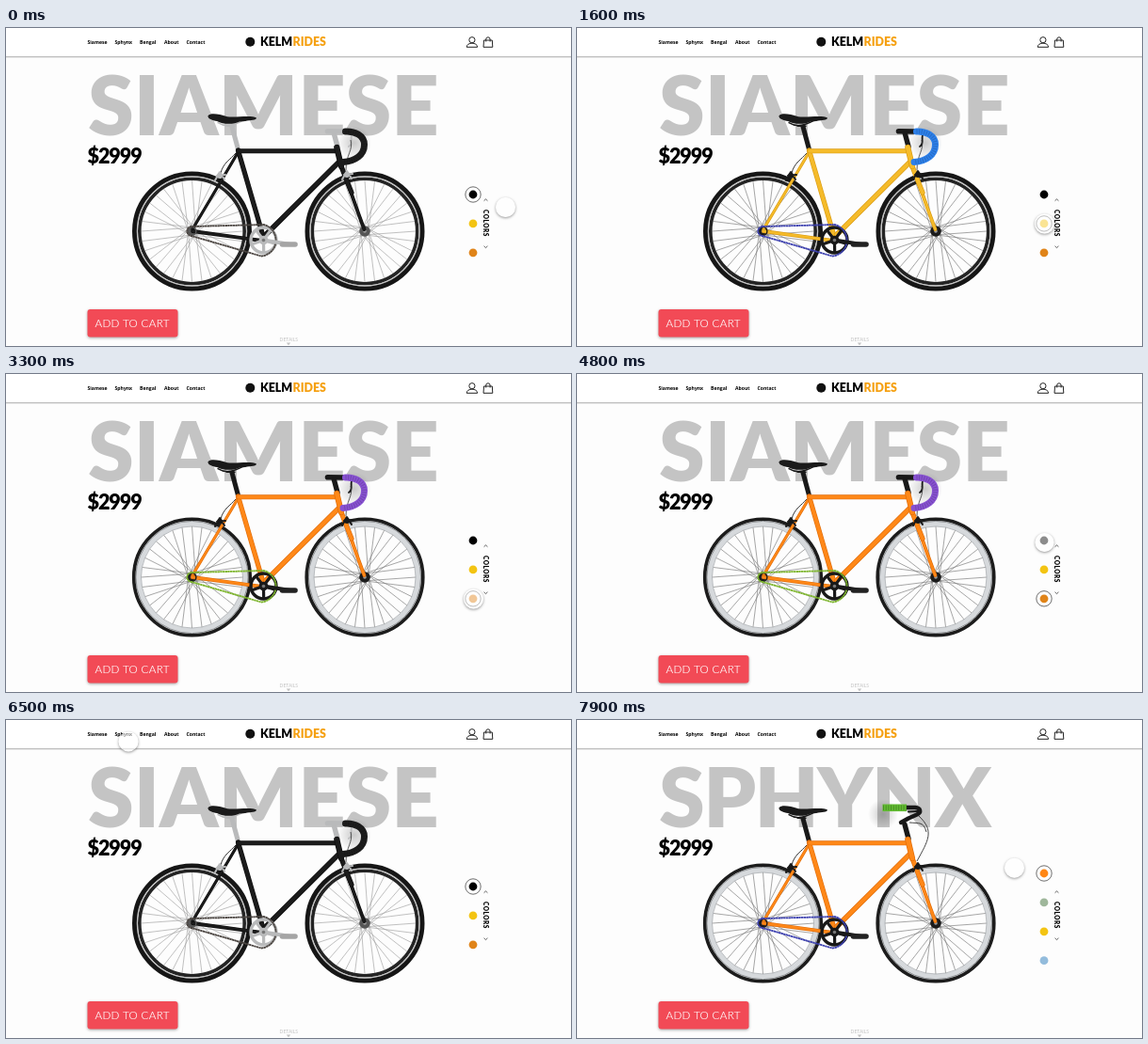
These frames come from a looping animation (600 px wide and 338 px high, 8 s). An HTML page:

```html
<!DOCTYPE html>
<html lang="en">
<head>
<meta charset="utf-8">
<title>Bike shop</title>
<style>
html, body { margin: 0; width: 100%; height: 100%; overflow: hidden; background: #fdfdfd; }
svg { position: absolute; left: 0; top: 0; font-family: Lato, sans-serif; }
#scenes { isolation: isolate; }
.scene { mix-blend-mode: plus-lighter; }
.nav { font: 700 5.1px "Open Sans", sans-serif; }
.button { fill: #f24a56; filter: drop-shadow(0 1px 1.5px rgba(0,0,0,.35)); }
#cursor {
  position: absolute; left: -10.5px; top: -10.5px; width: 21px; height: 21px; border-radius: 50%;
  background: rgba(255,255,255,.55); box-shadow: 0 1px 3px rgba(0,0,0,.42);
}
</style>
</head>
<body>
<svg width="600" height="338" viewBox="0 0 600 338">
  <radialGradient id="shade">
    <stop offset="0" stop-opacity=".2"/><stop offset="1" stop-opacity="0"/>
  </radialGradient>
  <rect width="600" height="30" fill="#fff"/>
  <path d="M0 30.4H600" stroke="#b4b4b4"/>
  <path d="M0 31.4H600" stroke="#e4e4e4"/>
  <g class="nav">
    <text x="86.5" y="17">Siamese</text><text x="115.5" y="17">Sphynx</text>
    <text x="142" y="17">Bengal</text><text x="168" y="17">About</text><text x="191.5" y="17">Contact</text>
  </g>
  <circle cx="259.3" cy="14.7" r="5" fill="#111"/>
  <g font-size="12.4" font-weight="900">
    <text x="270" y="19.2">KELM</text><text x="304.5" y="19.2" fill="#f5a011">RIDES</text>
  </g>
  <g fill="none" stroke="#222">
    <circle cx="494.9" cy="12.7" r="3.1"/>
    <path d="M489.2 20.3C489.2 14.8 500.6 14.8 500.6 20.3Z"/>
    <path d="M507.5 13H516.3L516.8 20.3H507Z"/>
    <path d="M509.7 14.5V12A2.2 2.2 0 0 1 514.1 12V14.5"/>
  </g>
  <g id="scenes"></g>
  <text x="86.5" y="143.7" font-size="21.6" font-weight="900" letter-spacing="-1.1">$2999</text>
  <rect class="button" x="86.5" y="299" width="96" height="29.5" rx="3"/>
  <text x="94.5" y="318" font-size="11.6" font-weight="300" letter-spacing=".35" fill="#fff" stroke="#fff" stroke-width=".15">ADD TO CART</text>
  <g fill="none" stroke="#333" stroke-width=".8">
    <path d="M507.6 183.7L509.5 181.9L511.4 183.7M507.6 231.8L509.5 233.6L511.4 231.8"/>
  </g>
  <text transform="translate(506.7 193) rotate(90)" font-size="6.5" font-weight="900" letter-spacing=".5">COLORS</text>
  <text x="300.3" y="333" font-size="5" fill="#c2c2c2" text-anchor="middle">DETAILS</text>
  <path d="M297.8 334.5H302.2L300 337.2Z" fill="#c2c2c2"/>
</svg>
<div id="cursor"></div>
<script>
const stroke = (d, color, width, extra = '') =>
  `<path d="${d}" fill="none" stroke="${color}" stroke-width="${width}" ${extra}/>`;
const ring = (x, y, r, color, width) =>
  `<circle cx="${x}" cy="${y}" r="${r}" fill="none" stroke="${color}" stroke-width="${width}"/>`;
const disc = (x, y, r, color) => `<circle cx="${x}" cy="${y}" r="${r}" fill="${color}"/>`;
const round = 'stroke-linecap="round" stroke-linejoin="round"';

function wheel(x, y, hub, b) {
  let spokes = '';
  for (let i = 0; i < 32; i++) {
    const a = i * Math.PI / 16, h = a + (i % 4 < 2 ? 1.25 : -1.25);
    spokes += `M${x + 4 * Math.cos(h)} ${y + 4 * Math.sin(h)}L${x + 54 * Math.cos(a)} ${y + 54 * Math.sin(a)}`;
  }
  const rim = b.silverRim
    ? ring(x, y, 56.8, '#d6d9dc', 5.6) + ring(x, y, 54, '#a0a4a8', .7) +
      ring(x, y, 59.6, '#8d9093', 1) + ring(x, y, 61.8, '#1c1c1c', 3.6)
    : ring(x, y, 55.7, '#242424', 3.6) + ring(x, y, 58.1, '#c4c4c4', 1.2) + ring(x, y, 61.1, '#161616', 4.8);
  return stroke(spokes, b.spoke, .65) + rim + disc(x, y, hub, b.hub) + disc(x, y, 1.8, '#999');
}

function tube(d, b, width) {
  return stroke(d, b.edge, width, round) + stroke(d, b.frame, width - 1.3, round);
}

function dropBar(b) {
  const grip = 'M360.5 110C370 109.5 380.5 114 380.5 124C380.5 135 371 141.5 358 142.5';
  return disc(370, 122, 18, 'url(#shade)') +
    stroke('M368 112C364 117 370 122 364 126', b.part, 1.8, round) +
    stroke('M366 119C369 130 361 134 361 151', '#333', .8) +
    stroke('M341.5 109.8L358 110', b.part, 5.6, round) +
    stroke(grip, b.grip, 7, 'stroke-linecap="round"') +
    stroke(grip, '#000', 5, 'stroke-dasharray="1 1.6" opacity=".16"');
}

function riserBar(b) {
  return disc(325, 100, 16, 'url(#shade)') +
    stroke('M363 102C380 118 373 128 361 150', '#333', .9) +
    stroke('M353 109C364 110 368 108 371 119', '#333', .9) +
    stroke('M344 109L352 104.5L361 100.5C366 98 365 93.5 359 93L350 93', b.part, 4.4, round) +
    stroke('M352 97.5L362 97', b.part, 2, round) +
    stroke('M324.5 93.3H350', b.grip, 7.6) +
    stroke('M325 93.3H350', '#000', 5.5, 'stroke-dasharray="1 1.7" opacity=".25"');
}

function bike(b) {
  let arms = '';
  for (let i = 0; i < 5; i++) {
    const a = i * Math.PI * .4 + .3;
    arms += `M273.5 225.5L${273.5 + 13 * Math.cos(a)} ${225.5 + 13 * Math.sin(a)}`;
  }
  const brake = (x, y) => disc(x, y, 3, b.part) +
    stroke(`M${x - 5} ${y + 5}L${x} ${y - 4}L${x + 5} ${y + 4}M${x - 3} ${y}L${x + 6} ${y - 1}`, b.part, 2, round);
  return wheel(197.5, 216, 4.4, b) + wheel(381, 216, 5.8, b) +
    stroke('M244 133C238 140 231 143 228 154', '#333', 1) +
    tube('M246.5 132L198 214', b, 3.2) + tube('M198 216L272 226', b, 3.8) +
    stroke('M239.5 103L246.5 129', b.part, 5) +
    tube('M246.5 130L273.5 223', b, 5.2) + tube('M352.5 143.5L275.5 220', b, 5.6) +
    tube('M247 130.8H350', b, 5) +
    tube('M356 147C363 164 372 192 380.5 214', b, 3.8) + tube('M356 147Q361 160 367 175', b, 5.2) +
    stroke('M348 111L352 126', b.part, 5.4, round) +
    tube('M351.3 127L356 147', b, 6.2) +
    brake(227, 157) + brake(362, 156) +
    stroke('M225 100.7C232 105.2 242 103.7 251 98.7M234 104.2H243', b.part, 1.4, round) +
    '<path d="M214.5 93.2C218 89.7 226 91.7 235 94.2C245 95.2 261 92.2 266 95.6C266 98.6 256 98.4 248 99.6C241 103 230 102.4 224 98.9C219 97.9 214 96.4 214.5 93.2Z" fill="#1a1a1a"/>' +
    (b.riser ? riserBar(b) : dropBar(b)) +
    ring(273.5, 225.5, 13.5, b.part, 3.4) + stroke(arms, b.part, 3.2) + disc(273.5, 225.5, 4.8, b.part) +
    ring(197.5, 216, 4.4, b.hub, 1.4) +
    stroke('M197.5 211L273.5 209A17 17 0 0 1 271 242.5L197 221A5 5 0 0 1 197.5 211', b.chain, 1.8, 'stroke-dasharray="2.4 .3"') +
    stroke('M273.5 225.5L302 230', b.part, 4, round) +
    stroke('M293.5 230H307', b.pedal, 5.6, round) + disc(273.5, 225.5, 1.8, '#777');
}

const dark = { part: '#191919', hub: '#1b1b1b', pedal: '#222', spoke: '#777' };
const orange = { ...dark, frame: '#ff8818', edge: '#df6b08', silverRim: true };
const bikes = [
  { frame: '#1c1c1c', edge: '#0c0c0c', part: '#b9babb', hub: '#555', pedal: '#a5a5a5', spoke: '#a0a0a0', grip: '#1d1d1d', chain: '#4a4440' },
  { ...dark, frame: '#f5bb2a', edge: '#d99a12', grip: '#2d80ea', chain: '#3c40b0' },
  { ...orange, grip: '#8852d2', chain: '#7db52c' },
  { ...orange, grip: '#62bd32', chain: '#3c40b0', riser: true }
];
const siamese = { name: 'SIAMESE', spacing: 0, top: 177, colors: ['#000', '#f3c413', '#e08419'] };
const sphynx = { name: 'SPHYNX', spacing: -1.6, top: 163, colors: ['#ff8716', '#9fb79b', '#f3c413', '#93bcdc'] };

function scene(model, chosen, b) {
  const y = i => model.top + i * 30.9;
  return `<g class="scene"><text x="87" y="114.4" font-size="88" font-weight="900" letter-spacing="${model.spacing}" fill="#c4c4c4">${model.name}</text>` +
    bike(b) + model.colors.map((c, i) => disc(496, y(i), 4.4, c)).join('') +
    ring(496, y(chosen), 8.2, '#333', .7) + '</g>';
}

const root = document.getElementById('scenes');
root.innerHTML = bikes.map((b, i) => i < 3 ? scene(siamese, i, b) : scene(sphynx, 0, b)).join('');
const layers = [...root.children];
const cursor = document.getElementById('cursor');

// [start, scene]
const fades = [[1000, 1], [2650, 2], [4900, 0], [6950, 3]];
// [start, end, from, control, to]
const moves = [
  [0, 900, [530, 190], [518, 206], [496, 207.5]],
  [1900, 2600, [496, 207.5], [507, 223], [496, 238.5]],
  [3750, 4500, [496, 238.5], [491, 208], [496, 178.5]],
  [5100, 6640, [496, 178.5], [200, 157], [126, 16]],
  [7250, 8045, [126, 16], [311, 130], [496, 163]]
];
const clamp = v => Math.max(0, Math.min(1, v));

function draw(now) {
  const t = now % 8000;
  let shown = [1, 0, 0, 0];
  for (const [start, n] of fades) {
    const k = clamp((t - start) / 500);
    shown = shown.map((o, i) => o * (1 - k) + (i === n ? k : 0));
  }
  layers.forEach((layer, i) => {
    layer.style.opacity = shown[i];
    layer.style.display = shown[i] ? '' : 'none';
  });

  const [start, end, from, via, to] = moves.filter(m => m[0] <= t).pop();
  const p = clamp((t - start) / (end - start)), u = p * p * (3 - 2 * p);
  const [x, y] = from.map((v, i) => v * (1 - u) ** 2 + 2 * via[i] * u * (1 - u) + to[i] * u * u);
  const press = Math.max(...fades.map(f => clamp(1 - Math.abs(t - f[0]) / 150)));
  cursor.style.transform = `translate(${x}px, ${y}px) scale(${1 - .12 * press})`;
  requestAnimationFrame(draw);
}
requestAnimationFrame(draw);
</script>
</body>
</html>
```
